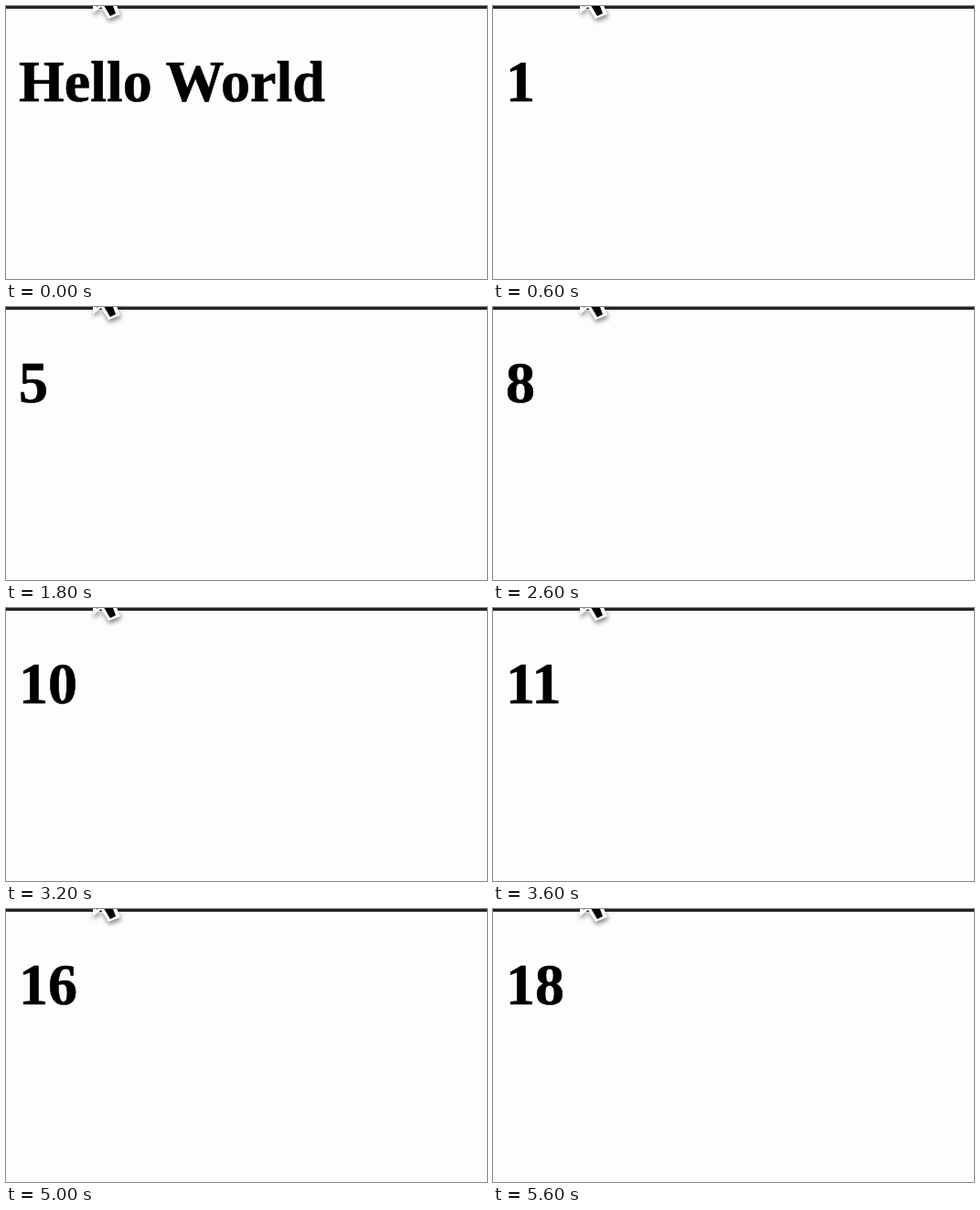
Write an HTML page that moves like this. It is 526 px wide and 298 px high and loops after 6 s.

```html
<!DOCTYPE html>
<html lang="en">
<head>
<meta charset="utf-8">
<title>Counter</title>
<style>
  html, body {
    margin: 0;
    width: 100%;
    height: 100%;
    overflow: hidden;
    background: #fdfdfb;
  }
  .bar {
    position: absolute;
    inset: 0 0 auto;
    height: 3px;
    background: #262427;
  }
  h1 {
    position: absolute;
    left: 14px;
    top: 47px;
    margin: 0;
    font: bold 64px/72px "Liberation Serif", "Times New Roman", serif;
    -webkit-text-stroke: .6px #000;
    color: #000;
    white-space: pre;
  }
  .pointer {
    position: absolute;
    left: -1px;
    top: 0;
    filter: drop-shadow(1px 3px 2.5px #0007);
  }
</style>
</head>
<body>
<div class="bar"></div>
<h1 id="label">Hello World</h1>
<svg class="pointer" width="140" height="30">
  <path fill="#fff" d="M96-8V8L105 1L113 14L126 9L119-8Z"/>
  <path d="M100-8V1L106-4L115 11L121 8L115-8Z"/>
</svg>
<script>
  const LOOP = 6000, SAMPLE = 200;
  const TICK = 293, FIRST_TICK = 240;
  const label = document.getElementById("label");
  const start = performance.now();

  // The counter ticks steadily but is only seen at each sample.
  function textAt(time) {
    const sampled = Math.floor(time / SAMPLE) * SAMPLE;
    if (sampled < SAMPLE) return "Hello World";
    return String(Math.max(0, Math.floor((sampled - FIRST_TICK) / TICK)));
  }

  function draw(now) {
    const text = textAt(Math.max(0, now - start) % LOOP);
    if (label.textContent !== text) label.textContent = text;
    requestAnimationFrame(draw);
  }
  draw(start);
</script>
</body>
</html>
```
